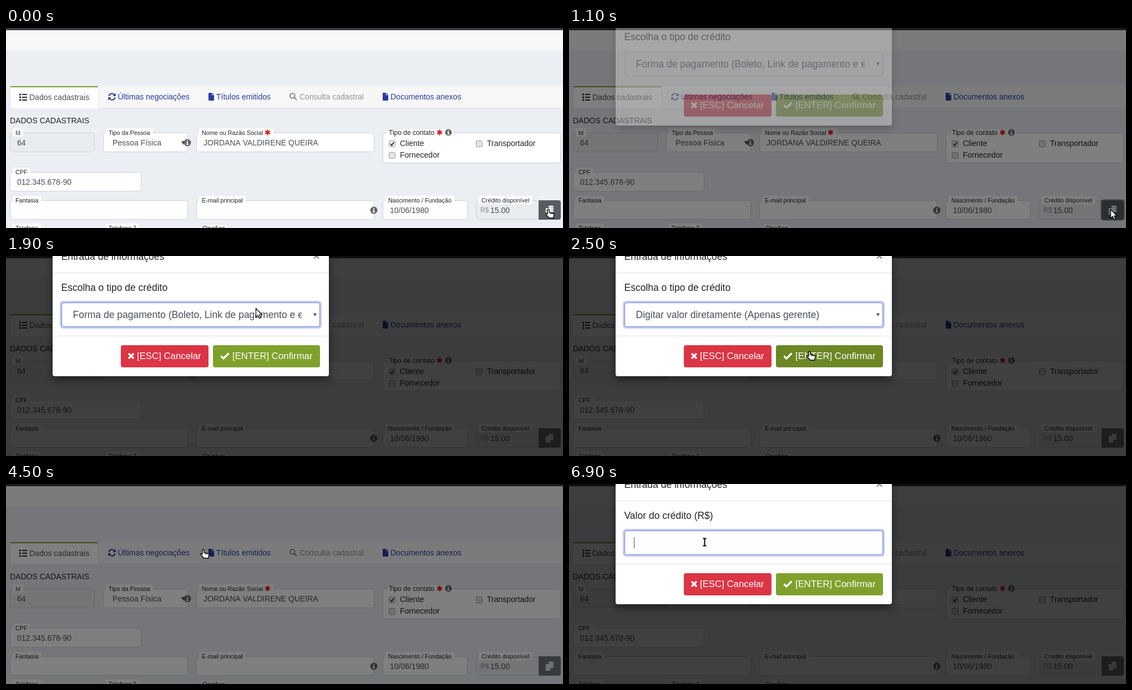
An HTML page with a canvas that plays this animation: 1004x361 px, repeating every 8000 ms.

```html
<!DOCTYPE html>
<html lang="pt-BR">
<head>
<meta charset="utf-8">
<title>Cadastro</title>
<style>
html, body { margin: 0; width: 100%; height: 100%; overflow: hidden; background: #ebeef3; }
canvas { display: block; }
</style>
</head>
<body>
<canvas id="stage" width="1004" height="361"></canvas>
<script>
const W = 1004, H = 361, LOOP = 8000;
const FAMILY = '"Liberation Sans", Arial, sans-serif';
const INK = '#212529', INPUT = '#495057', EDGE = '#ced4da', LINE = '#dee2e6';
const BLUE = '#263da3', GREEN = '#7fa12c', GREEN_DARK = '#6b8825';

const stage = document.getElementById('stage').getContext('2d');
const layer = document.createElement('canvas');
layer.width = W;
layer.height = H;
const layerCtx = layer.getContext('2d');
let g = stage;

// time, backdrop alpha, dialog alpha, dialog offset
const fades = [
  [0, 0, 0, -50], [900, .25, 0, -50], [1000, .4, .1, -47], [1100, .5, .33, -41],
  [1200, .65, .7, -20], [1300, .75, 1, -6], [1400, .75, 1, 0],
  [4200, .67, .17, -34], [4400, .6, 0, -50], [4500, .5, 0, -50],
  [4700, .67, .5, -28], [4900, .75, 1, 0]
];

// time, shape, x, y
const moves = [
  [0, 'hand', 977, 327], [900, 'arrow', 976, 327], [1400, 'arrow', 900, 300],
  [1500, 'arrow', 740, 255], [1600, 'arrow', 590, 215], [1700, 'hand', 432, 178],
  [1800, 'arrow', 440, 135], [1900, 'arrow', 450, 94], [2200, 'arrow', 446, 120],
  [2300, 'arrow', 440, 156], [2500, 'hand', 433, 172], [4200, 'arrow', 433, 171],
  [4400, 'arrow', 390, 145], [4500, 'hand', 355, 118], [4700, 'arrow', 336, 130],
  [4900, 'arrow', 320, 141], [5100, 'beam', 253, 115], [5300, 'beam', 249, 109],
  [5400, 'beam', 244.5, 105]
];

const at = (track, t) => track.filter(k => k[0] <= t).pop();

function rect(x, y, w, h, color) {
  g.fillStyle = color;
  g.fillRect(x, y, w, h);
}

function box(x, y, w, h, r, fill, edge) {
  const d = edge ? .5 : 0;
  g.beginPath();
  g.roundRect(x + d, y + d, w - 2 * d, h - 2 * d, r);
  if (fill) { g.fillStyle = fill; g.fill(); }
  if (edge) { g.strokeStyle = edge; g.lineWidth = 1; g.stroke(); }
}

function text(s, x, y, size = 14, color = INK) {
  g.font = size + 'px ' + FAMILY;
  g.fillStyle = color;
  g.fillText(s, x, y);
}

function shape(x, y, d, fill, stroke, width = 1) {
  const p = new Path2D(d);
  g.save();
  g.translate(x, y);
  if (fill) { g.fillStyle = fill; g.fill(p); }
  if (stroke) { g.strokeStyle = stroke; g.lineWidth = width; g.stroke(p); }
  g.restore();
}

function disc(x, y, r, color) {
  g.beginPath();
  g.arc(x, y, r, 0, 7);
  g.fillStyle = color;
  g.fill();
}

function star(x, y) {
  for (let i = 0; i < 3; i++) {
    const a = Math.PI / 2 + i * Math.PI / 3, c = 5 * Math.cos(a), s = 5 * Math.sin(a);
    shape(x, y, `M${-c} ${-s}L${c} ${s}`, null, '#e8141c', 2.3);
  }
}

function info(x, y, r = 6.5) {
  disc(x, y, r, '#666');
  rect(x - 1, y - 4, 2, 2, '#fff');
  shape(x, y, 'M-2 -1H1V2.6H2V4H-2V2.6H-1V.3H-2Z', '#fff');
}

function listIcon(x, y) {
  for (let i = 0; i < 3; i++) {
    rect(x, y + i * 5, 3, 3, INK);
    rect(x + 5, y + i * 5 + .5, 9, 2, INK);
  }
}

function syncIcon(x, y) {
  for (const turn of [0, Math.PI]) {
    g.save();
    g.translate(x, y);
    g.rotate(turn);
    shape(0, 0, 'M-5.6 -1.2A5.6 5.6 0 0 1 4.3 -3.5', null, BLUE, 2);
    shape(0, 0, 'M6.8 -6.5V-1H1.3Z', BLUE);
    g.restore();
  }
}

function fileIcon(x, y) {
  shape(x, y, 'M1 0H6V4H10V13Q10 14 9 14H1Q0 14 0 13V1Q0 0 1 0ZM7 0L10 3H7Z', BLUE);
}

function searchIcon(x, y) {
  shape(x, y, 'M9.6 5.3A4.3 4.3 0 1 1 1 5.3A4.3 4.3 0 1 1 9.6 5.3M8.8 8.8L13 13', null, '#868e96', 2.2);
}

function label(s, x, y, extra = 0) {
  g.font = '10.8px ' + FAMILY;
  box(x - 5, y - 8, g.measureText(s).width + 10 + extra, 15, 2, '#fff');
  text(s, x, y + 4, 10.8);
}

function field(name, x, y, w, value = '', opt = {}) {
  box(x, y, w, 35, 4, opt.off ? '#e9ecef' : '#fff', EDGE);
  label(name, x + 10, y, opt.extra);
  text(value, x + (opt.pad || 13), y + 23, 14, INPUT);
}

function check(s, x, y, on) {
  box(x, y - 6, 12, 12, 2, on ? '#eee' : '#e4e4e4', '#999');
  if (on) shape(x, y, 'M3 0L5.2 2.8L9.3 -3', null, '#333', 2);
  text(s, x + 20, y + 4);
}

function coins(x, y) {
  const coin = (cx, cy) => {
    g.beginPath();
    g.ellipse(cx, cy, 4.8, 2, 0, 0, 7);
    g.fillStyle = '#e9ecef';
    g.fill();
  };
  for (let i = 0; i < 3; i++) {
    coin(x + 2.5, y - 5.5 + i * 4);
    coin(x - 3, y - 1 + i * 4);
  }
}

function page(t) {
  rect(0, 0, W, H, '#ebeef3');
  rect(0, 0, W, 4, '#373945');
  rect(0, 4, W, 36, '#f7f7f7');

  rect(7, 105, W, 40, '#f7f7f7');
  rect(7, 144, W, 1, LINE);
  box(7, 105, 160, 44, 4, '#fff', LINE);
  rect(7, 145, 160, 5, '#ebeef3');
  rect(8, 105, 158, 2, GREEN);
  listIcon(24, 118.5);
  text('Dados cadastrais', 42, 130, 14, INPUT);
  syncIcon(191, 124);
  text('Últimas negociações', 201.5, 129, 14, BLUE);
  fileIcon(365, 117);
  text('Títulos emitidos', 379, 129, 14, BLUE);
  searchIcon(511, 117);
  text('Consulta cadastral', 529, 129, 14, '#8f969c');
  fileIcon(679, 117);
  text('Documentos anexos', 693, 129, 14, BLUE);

  text('DADOS CADASTRAIS', 7, 172);
  field('Id', 7, 189, 153, '64', { off: true });
  field('Tipo da Pessoa', 175, 189, 153, 'Pessoa Física', { pad: 17 });
  shape(319, 207, 'M-3 -3H4L.5 4Z', INPUT);
  info(327, 207);
  field('Nome ou Razão Social', 343, 189, 321, 'JORDANA VALDIRENE QUEIRA', { extra: 14 });
  star(471.5, 188.5);

  box(679, 189, 321, 55, 4, '#fff', EDGE);
  rect(688, 183, 117, 12, '#fff');
  text('Tipo de contato', 690, 193, 12);
  star(781.5, 188.5);
  info(797.5, 188.5, 6);
  check('Cliente', 690, 209, true);
  check('Transportador', 847, 209);
  check('Fornecedor', 690, 230);

  field('CPF', 7, 260, 237, '012.345.678-90');
  field('Fantasia', 7, 311, 321);
  field('E-mail principal', 343, 311, 321);
  info(663, 329);
  field('Nascimento / Fundação', 679, 311, 153, '10/06/1980');
  field('Crédito disponível', 847, 311, 116, '15.00', { off: true, pad: 26 });
  text('R$', 855, 333, 12, '#868e96');

  const pressed = t < 1300;
  if (pressed && t >= 900) box(958, 309, 44, 39, 5, 'rgba(108,117,125,.6)');
  box(960, 311, 40, 35, [0, 4, 4, 0], pressed ? '#555c63' : '#6c757d');
  coins(980, 328);

  label('Telefone', 17, 361);
  label('Telefone 2', 185, 361);
  rect(352, 355, 45, 6, '#fff');
  text('Opções', 354, 366, 12);
}

function button(s, x, w, color, pad) {
  box(x, 161, w, 40, 4, color);
  text(s, x + pad, 186, 16.8, '#fff');
}

function options(second) {
  box(100, 128, 488, 48, 0, '#fff', '#a5a5a5');
  rect(101, second ? 152 : 129, 486, 23, '#d8dbe0');
  text('Forma de pagamento (Boleto, Link de pagamento e etc)', 121, 147, 17.5, INPUT);
  text('Digitar valor diretamente (Apenas gerente)', 121, 170, 17.5, INPUT);
}

function dialog(t) {
  const asking = t >= 4600;
  g.save();
  g.shadowColor = 'rgba(0,0,0,.5)';
  g.shadowBlur = 14;
  g.shadowOffsetY = 6;
  box(84, -60, 498, 277, 4, '#fff');
  g.restore();

  text('Entrada de informações', 99.5, 7, 17.5);
  shape(559.5, 0, 'M-4.5 -4.5L4.5 4.5M4.5 -4.5L-4.5 4.5', null, '#7f7f7f', 2);
  rect(84, 30, 498, 1, LINE);
  rect(84, 144, 498, 1, LINE);
  text(asking ? 'Valor do crédito (R$)' : 'Escolha o tipo de crédito', 99.5, 63, 17.5);

  const focused = t >= 1300 && t < 4200 || t >= 4900;
  if (focused) box(97, 81, 472, 50, 6, '#c3cbf0');
  box(100, 84, 466, 44, 4, '#fff', focused ? '#7184d8' : EDGE);

  if (asking) {
    const value = t >= 5300 && t < 6900 ? '0' : '';
    text(value, 116.5, 112, 17.5, INPUT);
    if (focused) rect(value ? 127 : 117, 96, 1, 20, INPUT);
  } else {
    g.save();
    g.beginPath();
    g.rect(100, 84, 433, 44);
    g.clip();
    text(t < 2400 ? 'Forma de pagamento (Boleto, Link de pagamento e etc)'
      : 'Digitar valor diretamente (Apenas gerente)', 120.5, 112, 17.5, INPUT);
    g.restore();
    shape(557, 106, 'M-3 -2.5H3L0 3Z', INPUT);
  }

  const hover = t >= 1700 && t < 1800 || t >= 2500 && t < 4400;
  button('[ESC] Cancelar', 207, 158, '#dc3545', 29);
  shape(225.5, 180.5, 'M-4.5 -4.5L4.5 4.5M4.5 -4.5L-4.5 4.5', null, '#fff', 3.4);
  button('[ENTER] Confirmar', 373, 193, hover ? GREEN_DARK : GREEN, 35);
  shape(394.5, 180.5, 'M-7 0L-2.5 4.5L7 -5', null, '#fff', 3.4);

  if (t >= 2100 && t < 2400) options(t >= 2300);
}

function cursor(kind, x, y) {
  if (kind === 'arrow') {
    shape(x, y, 'M.5 .5V16.5L4 13L6.5 18.5L9 17.5L6.6 12H11.5Z', '#fff', '#000', 1.2);
  } else if (kind === 'hand') {
    shape(x, y, 'M-1 1Q.5 -.5 2 1V6L9 7.5Q11 8 11 10L10 14V16H2L-4 9.5Q-4.5 7.5 -2.5 7.5L-1 9Z', '#fff', '#000', 1.3);
    shape(x, y, 'M4.5 7V9M7.2 7.5V9.5', null, '#000');
  } else {
    const beam = 'M-3 -6.5H3M0 -6.5V6.5M-3 6.5H3';
    shape(x, y, beam, null, '#fff', 4);
    shape(x, y, beam, null, '#000', 2);
  }
}

function draw(t) {
  const [, shade, alpha, dy] = at(fades, t);
  g = stage;
  page(t);
  rect(0, 0, W, H, `rgba(0,0,0,${shade})`);
  if (alpha) {
    g = layerCtx;
    g.clearRect(0, 0, W, H);
    g.save();
    g.translate(0, dy);
    dialog(t);
    g.restore();
    g = stage;
    g.globalAlpha = alpha;
    g.drawImage(layer, 0, 0);
    g.globalAlpha = 1;
  }
  cursor(...at(moves, t).slice(1));
}

const start = performance.now();
function tick() {
  draw((performance.now() - start) % LOOP);
  requestAnimationFrame(tick);
}
tick();
</script>
</body>
</html>
```
